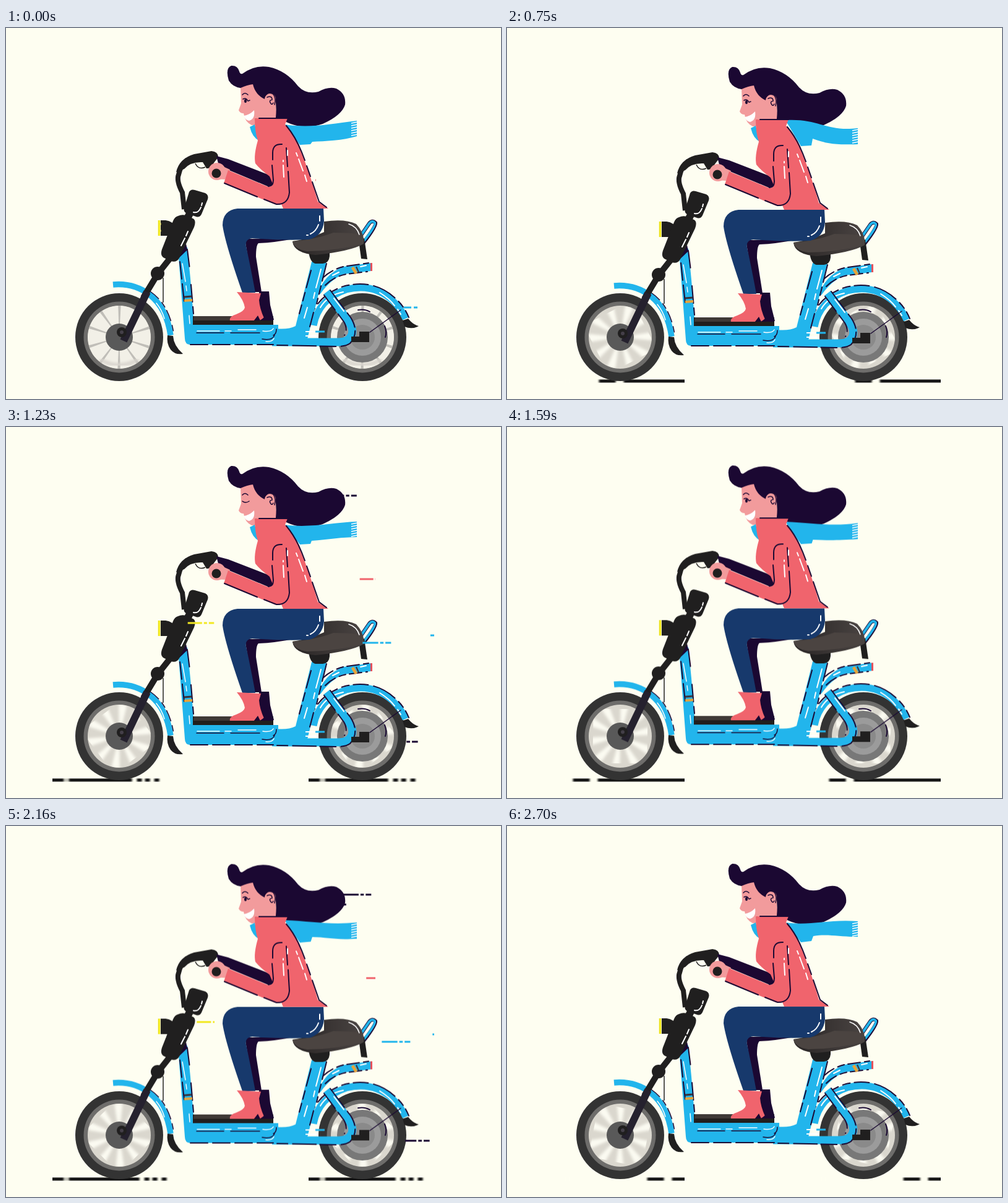
These frames come from a looping animation (800 by 600 pixels, 2730 ms). An HTML page without scripts:

```html
<!DOCTYPE html>
<html lang="en">
<head>
<meta charset="utf-8">
<title>Electric bike ride</title>
<style>
  html, body { margin: 0; width: 100%; height: 100%; overflow: hidden; background: #fefef1; }
  svg { display: block; width: 100vw; height: 100vh; }

  .bob { animation: bob 2730ms linear infinite; }
  @keyframes bob {
    0%, 100% { transform: translateY(0); }
    13% { transform: translateY(1px); }
    27%, 45% { transform: translateY(2px); }
    71% { transform: translateY(.6px); }
    88% { transform: translateY(.4px); }
  }

  .spin { animation: spin 910ms linear infinite; }
  @keyframes spin { to { transform: rotate(-360deg); } }

  .rest { animation: rest 2730ms step-end infinite; }
  @keyframes rest { 0% { opacity: 1; } 1.1%, 100% { opacity: 0; } }

  .open { animation: open 2730ms step-end infinite; }
  .shut { animation: shut 2730ms step-end infinite; }
  @keyframes open { 0%, 47.5% { opacity: 1; } 42% { opacity: 0; } }
  @keyframes shut { 0%, 47.5% { opacity: 0; } 42% { opacity: 1; } }

  .streak { animation: streak 910ms linear infinite; }
  @keyframes streak { from { transform: translateX(-302px); } to { transform: translateX(244px); } }
  .ahead { animation: ahead 2730ms step-end infinite; }
  @keyframes ahead { 0% { opacity: 0; } 5%, 100% { opacity: 1; } }

  /* A broken piece --s long runs along a line --l long, starting at --b. */
  .wind path {
    stroke-dasharray: calc(var(--s) * .55px) 3px calc(var(--s) * .12px) 3px calc(var(--s) * .2px) 999px;
    animation: wind 910ms var(--b) infinite backwards;
  }
  .wind .slow { animation-name: slow; }
  @keyframes wind {
    0% { stroke-dashoffset: calc(var(--s) * 1px); animation-timing-function: cubic-bezier(.3,0,.4,1); }
    26%, 100% { stroke-dashoffset: calc(var(--l) * -1px); }
  }
  @keyframes slow {
    0% { stroke-dashoffset: calc(var(--s) * 1px); animation-timing-function: cubic-bezier(.3,0,.4,1); }
    36%, 100% { stroke-dashoffset: calc(var(--l) * -1px); }
  }

  .line { fill: none; stroke: #1b0a33; stroke-linecap: round; }
  .shine { fill: none; stroke: #fff; stroke-linecap: round; }
  .tube { fill: none; stroke: #22b5ec; }
  .dark { fill: #1b0832; }
  .black { fill: #201f1f; }
  .blue { fill: #22b5ec; }
  .coral { fill: #f0646d; }
  .skin { fill: #f29b9c; }
</style>
</head>
<body>
<svg viewBox="0 0 800 600" stroke-width="2">
  <defs>
    <filter id="soft" x="-10%" y="-10%" width="120%" height="120%"><feGaussianBlur stdDeviation="2.2"/></filter>
    <filter id="smear" filterUnits="userSpaceOnUse" x="-20" y="560" width="400" height="22"><feGaussianBlur stdDeviation="1.6 0"/></filter>
    <linearGradient id="leather"><stop stop-color="#292525"/><stop offset="1" stop-color="#4a4442"/></linearGradient>
    <clipPath id="road"><rect x="75" y="560" width="212" height="20"/></clipPath>
    <clipPath id="rim"><circle r="51"/></clipPath>

    <g id="tyre">
      <circle r="71" fill="#333"/>
      <circle r="57.500" fill="#6e6d6b"/>
      <circle r="51" fill="#dad7ce"/>
    </g>
    <circle id="blur" r="36" fill="none" stroke="#fbfaf1" stroke-width="32" pathLength="360" stroke-dasharray="15 21" filter="url(#soft)"/>
    <g id="spokes">
      <circle r="51" fill="#f2f0e7"/>
      <circle r="36" fill="none" stroke="#c0beb8" stroke-width="32" pathLength="360" stroke-dasharray="5 31" transform="rotate(-92)"/>
      <path d="M-31,36Q0,54 31,36" fill="none" stroke="#d8d4cd" stroke-width="6" filter="url(#soft)"/>
    </g>
    <path id="mark" d="M0,571H357" fill="none" stroke="#161414" stroke-width="5" stroke-dasharray="27 13 273 8 8 5 8 7 8 999" filter="url(#smear)"/>
    <path id="gap" d="M93,571h9" stroke="#fefef1" stroke-width="6" opacity=".75" filter="url(#smear)"/>
  </defs>

  <rect width="800" height="600" fill="#fefef1"/>

  <!-- ground streaks -->
  <g clip-path="url(#road)">
    <g class="streak"><use href="#mark"/></g>
    <g class="ahead"><g class="streak"><use href="#mark" x="546"/></g></g>
    <use href="#gap"/>
  </g>
  <g transform="translate(414)"><g clip-path="url(#road)">
    <g class="streak"><use href="#mark"/></g>
    <g class="ahead"><g class="streak"><use href="#mark" x="546"/></g></g>
    <use href="#gap"/>
  </g></g>

  <!-- wheels -->
  <g transform="translate(183 500)">
    <use href="#tyre"/>
    <g clip-path="url(#rim)">
      <g class="spin"><use href="#blur"/></g>
      <g class="rest"><use href="#spokes"/></g>
    </g>
    <circle r="22" fill="#595959"/>
  </g>
  <g transform="translate(576 500)">
    <use href="#tyre"/>
    <g clip-path="url(#rim)">
      <g class="spin"><use href="#blur"/></g>
      <g class="rest"><use href="#spokes"/></g>
    </g>
    <circle r="41" fill="#787878"/>
    <circle r="30" fill="#9b9b9b"/>
    <circle r="20" fill="#8a8a8a"/>
    <path class="line" d="M-7,-44Q4,-46 12,-41M36,-18Q40,-8 37,0"/>
  </g>

  <g class="bob">
    <!-- rear fender and tail light -->
    <path class="tube" d="M497,481Q505,438 550,423Q593,412 624,440Q639,454 646,470" stroke-width="11"/>
    <path class="line" d="M491,476Q500,432 548,417Q595,406 628,436Q644,450 651,468" stroke-dasharray="24 9 40 8 12 7"/>
    <path class="shine" d="M508,452Q520,432 545,427M604,428Q620,438 628,449M633,455l5,8"/>
    <path class="black" d="M641,473l9,-3Q658,480 667,482Q656,488 644,483Z"/>
    <path class="line" d="M588,492L638,456" stroke-width="1.5"/>
    <path class="blue" d="M503,432Q514,398 545,386L590,380V393L546,398Q525,406 508,430Z"/>
    <path class="line" d="M512,404Q526,391 545,386L586,380M516,416Q530,402 550,398L584,394" stroke-dasharray="20 7 11 6"/>
    <path d="M560,387l6,10" stroke="#e5a43b" stroke-width="5"/>
    <path d="M566,386l4,9" stroke="#3c3138"/>
    <path d="M589,380h3v13h-3z" fill="#e4525d"/>
    <path class="shine" d="M528,400l10,-5M573,386l9,-2"/>

    <!-- main frame -->
    <path class="tube" d="M518,427L552,472Q567,492 553,504Q547,508 536,508H430" stroke-width="13"/>
    <path class="line" d="M524,424L557,468Q572,492 556,510Q549,515 535,515L438,513" stroke-dasharray="38 8 26 6"/>
    <path class="line" d="M514,432L546,475Q553,487 547,497" stroke-dasharray="30 8"/>
    <path class="blue" d="M494,378H518L499,455L487,503H436V486Q456,488 468,482Z"/>
    <path class="line" d="M518,381L502,446M497,460L491,483M493,392L474,462" stroke-dasharray="29 8 14 7"/>
    <path class="shine" d="M509,390L501,420M499,428l-2,9M487,452l-5,17M530,437l16,21"/>
    <path class="blue" d="M279,371L293,354L298,405L304,480H440V512H298Q289,512 289,502Z"/>
    <path class="line" d="M293,358L297,390M299,415L303,462M281,378L288,442M298,512H432" stroke-dasharray="28 8"/>
    <path class="line" d="M308,493H352M363,493H410M432,497Q437,495 437,487M414,503Q430,506 434,497" stroke-width="1.5"/>
    <path class="shine" d="M309,490H345M354,490h10M375,488H404M415,490Q429,492 432,486M420,507Q430,508 433,502M285,381L290,410M291,417l1,8M296,465l1,13" stroke-width="1.5"/>
    <path d="M484,491H505M484,498H505" stroke="#fff"/>
    <path d="M500,491h15" stroke="#22b5ec" stroke-width="3"/>
    <path d="M288,435l12,-1" stroke="#39313a" stroke-width="3"/>
    <path d="M288,441l13,-1" stroke="#e5a43b" stroke-width="4"/>
    <path d="M302,466H432V480H302Z" fill="#211e1d"/>
    <path d="M304,466H372L364,473H303Z" fill="#3f3936"/>
    <path class="black" d="M558,499h13v-8h16v17h-29z"/>

    <!-- seat -->
    <path class="line" d="M574,335L587,316Q592,310 597,315Q599,320 577,348" stroke-width="6"/>
    <path class="tube" d="M574,335L587,316Q592,310 596,315Q598,320 577,346" stroke-width="4"/>
    <path class="shine" d="M579,336L592,318" stroke-width="1.5"/>
    <path class="black" d="M570,344l9,-4l5,34l-10,-1Z"/>
    <path class="black" d="M489,361H523V369Q522,380 512,381H500Q491,379 489,361Z"/>
    <path d="M463,345Q490,341 514,330V313Q548,308 566,317Q580,332 578,349Q558,361 500,367Q465,364 463,345Z" fill="url(#leather)"/>
    <path d="M463,345Q500,342 529,331Q552,331 571,333Q574,341 573,349Q540,360 487,361Q466,358 463,345Z" fill="#4b4441"/>
    <path class="shine" d="M554,317Q567,321 571,334" stroke-width="1.5"/>

    <!-- front fender and fork -->
    <path class="tube" d="M173,415Q207,412 233,432Q260,454 266,497" stroke-width="9.500"/>
    <path class="line" d="M233,426Q264,447 271,494" stroke-width="1.5" stroke-dasharray="18 8 9 6"/>
    <path class="shine" d="M243,445q9,11 13,25" stroke-width="1.5"/>
    <path class="black" d="M261,497l9,1Q271,514 286,527Q273,529 266,520Q259,510 261,497Z"/>
    <path d="M254,404V444" stroke="#222" stroke-width="1.5"/>
    <g fill="none" stroke="#201f1f">
      <path d="M271,365L245,398L222,436" stroke-width="10"/>
      <path d="M228,427L190,506" stroke="#25212e" stroke-width="12"/>
      <path d="M301,292L290,314" stroke-width="12"/>
      <path d="M288,293L285,266Q275,247 279,237Q282,222 293,213" stroke-width="8"/>
      <path d="M306,219Q311,230 322,225" stroke-width="1.5"/>
    </g>
    <path class="black" d="M275,233Q280,211 304,204L332,199Q343,200 343,209L336,218Q332,228 324,227L318,217Q298,216 288,228Z"/>
    <circle class="black" cx="245" cy="397" r="11"/>
    <circle class="black" cx="187" cy="492" r="8"/>
    <circle cx="187" cy="492" r="3" fill="#443f49"/>
    <path class="dark" d="M291,349L293,359L274,377Z"/>
    <path class="black" d="M250,311h8Q270,312 273,323L264,336H250Z"/>
    <path d="M247.500,311v25" stroke="#efe61e" stroke-width="3.500"/>
    <path class="black" d="M278,304Q284,301 291,303L302,308Q308,311 304,322L280,372Q276,380 266,377L254,371Q249,367 252,358L270,312Q273,305 278,304Z"/>
    <path class="black" d="M296,265Q299,260 305,262L322,267Q328,270 326,277L316,301Q313,307 307,305L292,300Q286,297 288,291Z"/>
    <path class="shine" d="M317,283l-1,4M315,290Q311,300 303,298M294,329l-3,7M289,340l-6,12"/>

    <!-- far arm and leg -->
    <path class="dark" d="M340,207L359,212L431,240L436,252L425,257L344,223Z"/>
    <path class="dark" d="M386,341L470,340Q435,347 408,348Q404,351 404,370L413,427H400Z"/>
    <path class="dark" d="M409,426H425L427,448L433,472H408Z"/>

    <!-- near leg -->
    <path d="M513,292H374Q350,295 350,319Q354,348 382,428H403Q395,385 388,353Q386,341 398,340Q450,344 490,342Q512,336 514,312Z" fill="#17396c"/>
    <path class="shine" d="M507,304V312M505,318Q501,329 492,333M488,335h-2"/>
    <path class="coral" d="M373,427L412,429L409,440Q410,454 417,469L410,473L407,466L401,473H362Q360,467 372,463Q385,458 386,452Q384,440 373,427Z"/>
    <path class="dark" d="M401,473l6,-8l4,8l6,-5l4,5l4,-8l7,8z"/>

    <!-- head -->
    <path class="skin" d="M379,95L380,122L376,133Q378,138 384,138Q386,152 397,157H403V147H438L434,98L399,86Z"/>
    <path d="M384,142Q393,141 401,133Q403,147 393,150Q387,149 384,142Z" fill="#fff"/>
    <path class="line" d="M382,108Q386,103 391,108" stroke-width="1.500"/>
    <g class="open">
      <path class="line" d="M383,115Q388,112 391,118L394,117" stroke-width="1.500"/>
      <ellipse class="dark" cx="387" cy="118" rx="2" ry="3"/>
    </g>
    <path class="line shut" d="M382,118Q387,122 393,118" stroke-width="1.500"/>
    <path class="dark" d="M379,97Q366,95 360,85Q354,65 364,61Q374,60 377,70Q378,75 382,74Q402,59 425,63Q453,69 472,94Q485,108 505,103Q521,94 534,98Q550,106 548,124Q543,141 512,155Q485,164 460,155L436,145Q438,125 434,109Q425,102 418,115Q403,108 399,91Q390,92 379,97Z"/>
    <ellipse class="skin" cx="427" cy="115" rx="9" ry="10"/>
    <path class="line" d="M418,111Q424,102 432,107Q437,114 434,124M422,112Q430,109 430,116Q424,117 428,122Q430,125 432,121" stroke-width="1.500"/>

    <!-- scarf -->
    <path class="blue" d="M394,160L402,156L409,182Q398,177 394,160Z"/>
    <path class="blue">
      <animate attributeName="d" dur="2730ms" repeatCount="indefinite" keyTimes="0;.132;.275;.45;.714;.879;1" values="
        M450,156C490,162 520,156 567,150V175C545,182 515,183 495,184L492,188L475,189Z;
        M450,155C490,162 520,160 567,151V177C545,185 515,186 495,185L492,188L475,189Z;
        M450,147C505,144 515,166 567,160V186C530,187 520,186 494,177L492,188L475,189Z;
        M450,156C490,162 530,152 567,151V176C545,176 520,180 494,182L492,187L475,188Z;
        M450,148C500,146 520,168 567,157V184C525,188 520,184 495,180L493,187L475,188Z;
        M450,156C490,162 520,150 567,154V179C540,180 520,174 495,178L492,186L475,188Z;
        M450,156C490,162 520,150 567,154V179C540,180 520,174 495,178L492,186L475,188Z"/>
    </path>
    <path d="M558,154l10,-2m-10,6l10,-2m-10,6l10,-2m-10,6l10,-2m-10,6l10,-2m-10,6l10,-2" stroke="#fff" stroke-width="1.500">
      <animateTransform attributeName="transform" type="translate" dur="2730ms" repeatCount="indefinite" keyTimes="0;.132;.275;.45;.714;.879;1" values="0 0;0 1;0 10;0 1;0 7;0 4;0 4"/>
    </path>

    <!-- jacket and near arm -->
    <path class="coral" d="M402,146H455L451,156Q465,172 475,195Q493,240 504,281L521,292H448L426,240Q410,228 403,219Q400,206 407,182Q402,168 402,146Z"/>
    <path class="line" d="M409,146H455M453,158Q468,176 478,201L483,214M486,223L492,240M495,249L506,281L518,290"/>
    <circle class="skin" cx="341" cy="232" r="14"/>
    <path class="skin" d="M340,219L362,229L354,245L338,244Z"/>
    <circle class="black" cx="340" cy="235" r="7.500"/>
    <path class="coral" d="M430,205Q430,188 442,187Q455,190 456,210L458,268Q456,289 434,285L352,251L359,230L424,257Q434,256 433,245Z"/>
    <path class="line" d="M431,213V202Q431,187 446,188M453,194L455,224M456,232L458,266Q456,286 437,285L417,277M406,273L353,251M430,222L432,246Q432,256 424,256"/>
    <path class="shine" d="M448,222L449,241M448,214v2M469,202l2,5M473,212L480,231M483,238l3,10M455,198v8"/>
  </g>

  <g class="wind" fill="none" stroke-width="3">
    <g stroke="#1b0a33">
      <path d="M540,111H652" style="--s:45;--l:112;--b:272ms"/>
      <path d="M540,127H658" style="--s:45;--l:118;--b:312ms"/>
      <path d="M645,509H725" style="--s:48;--l:80;--b:273ms"/>
      <path d="M645,520H725" style="--s:48;--l:80;--b:70ms"/>
    </g>
    <g stroke="#22b5ec">
      <path d="M575,349H725" style="--s:46;--l:150;--b:262ms"/>
      <path class="slow" d="M577,337H692" style="--s:46;--l:115;--b:56ms"/>
      <path d="M640,452H725" style="--s:46;--l:85;--b:41ms"/>
      <path d="M640,463H725" style="--s:46;--l:85;--b:78ms"/>
    </g>
    <g stroke="#f0646d">
      <path d="M500,246H597" style="--s:40;--l:97;--b:178ms"/>
      <path d="M480,235H597" style="--s:38;--l:117;--b:61ms"/>
    </g>
    <g stroke="#f2e822">
      <path d="M250,317H337" style="--s:42;--l:87;--b:206ms"/>
      <path d="M250,328H337" style="--s:42;--l:87;--b:55ms"/>
    </g>
  </g>
  <path class="rest" d="M643,452h12m4,0h6" stroke="#22b5ec" stroke-width="3"/>
</svg>
</body>
</html>
```
